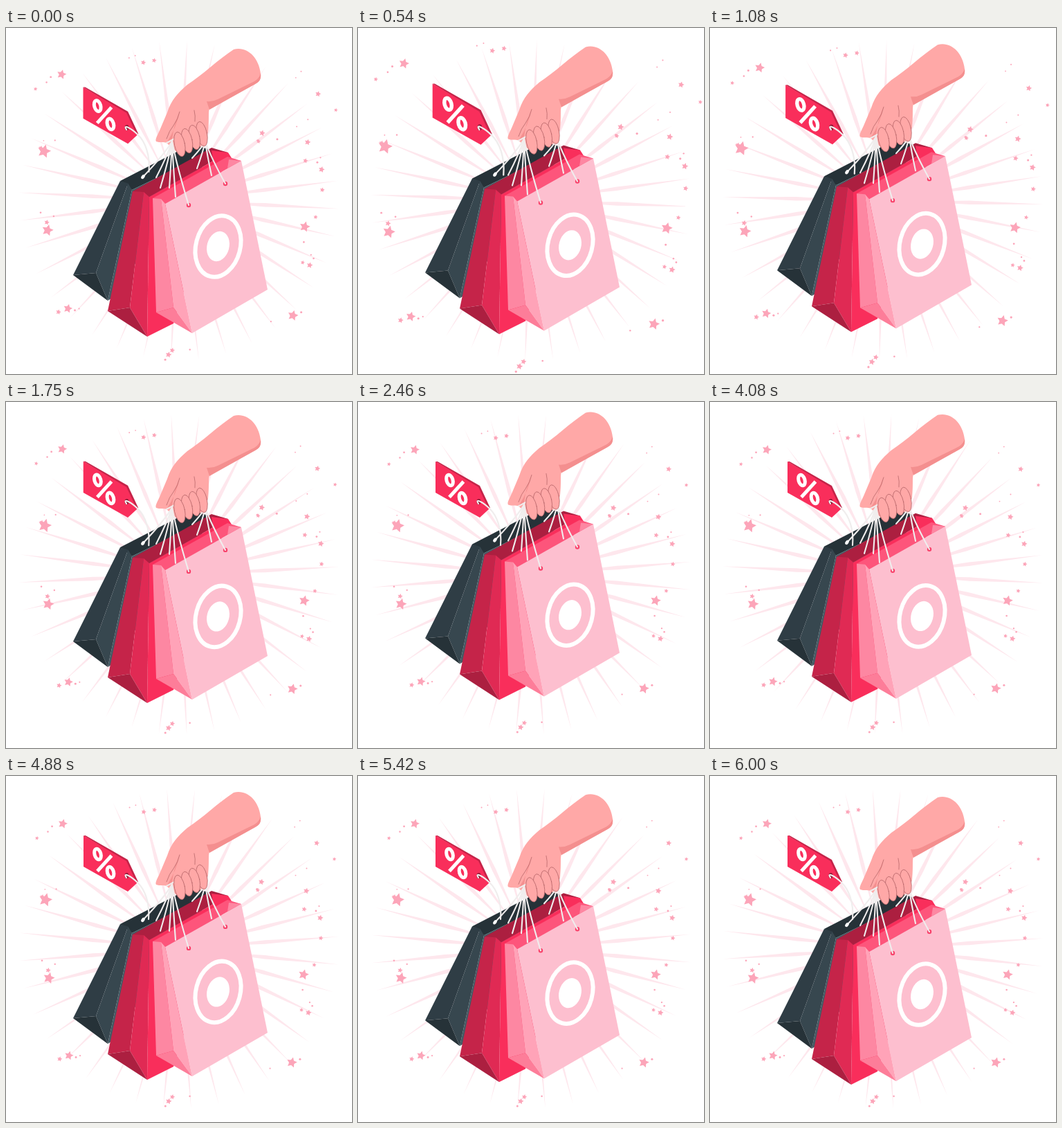
Write an HTML page that moves like this. It is 500 by 500 pixels and loops after 6040 ms.

```html
<!DOCTYPE html>
<html lang="en">
<head>
<meta charset="utf-8">
<title>Shopping bags</title>
<style>
  html, body { margin: 0; width: 100%; height: 100%; overflow: hidden; background: #fff; }
  svg { display: block; width: 100vw; height: 100vh; }
  .cord { fill: none; stroke: #f0eded; stroke-width: 2.1; stroke-linecap: round; }
  .crease { fill: none; stroke: #b8676a; stroke-width: .8; stroke-linecap: round; }
  .skin { fill: #ffa8a7; }
  .shade { fill: #f48f8f; }
  .percent { fill: none; stroke: #fff; stroke-width: 5; }
</style>
</head>
<body>
<svg viewBox="0 0 500 500">
  <g id="rays" fill="#fee7ed"></g>
  <g id="stars" fill="#fca5b9"></g>

  <g id="lift">
    <path class="skin" d="M329 31C347 26 365 41 368 66C369 74 366 78 360 81L294 117C292 122 294 130 292 150L286 172L250 182L232 166C228 164 222 166 217 164C215 161 219 155 222 148L233 122C239 104 248 94 262 82C284 68 307 45 329 31Z"/>
    <path class="shade" d="M368 66C369 74 366 78 360 81L294 118Q292 112 290 106Q298 107 306 103L355 79Q365 75 368 66Z"/>
    <path class="shade" d="M250 122Q247 143 232 166L240 160Q242 143 250 122Z"/>
    <path class="crease" d="M251 121Q249 131 242 141Q236 148 232 160M272 119Q274 127 273 135"/>
    <g id="bags"></g>
  </g>

  <g id="emblem" fill="#fff">
    <ellipse rx="32" ry="45" fill="none" stroke="#fff" stroke-width="6"/>
    <ellipse rx="16" ry="22"/>
  </g>

  <g id="tag">
    <path fill="#f92e5b" d="M112 86L175 122L190 154L176 167L112 131Z"/>
    <path fill="#c52449" d="M112 86L115 86L176 121L191 153L188 153L174 123Z"/>
    <ellipse class="percent" rx="4.500" ry="8" transform="translate(132.500 113) rotate(-16)"/>
    <ellipse class="percent" rx="4.500" ry="8" transform="translate(151 139) rotate(-16)"/>
    <path class="percent" d="M152.500 115L132 137.500"/>
    <ellipse cx="174.500" cy="144" rx="3" ry="4" fill="#8f1a36"/>
    <path class="cord" d="M174 147C168 138 181 145 190 154C201 164 208 184 206 207"/>
  </g>

  <g id="grip"></g>
</svg>
<script>
const FRAMES = 145, FRAME = 1000 / 24;
const el = id => document.getElementById(id);
const each = (n, make) => Array.from({ length: n }, (_, i) => make(i));
const poly = (fill, ...points) => `<polygon fill="${fill}" points="${points.join(' ')}"/>`;

let seed = 7;
const random = () => (seed = seed * 16807 % 2147483647) / 2147483647;
const jitter = range => (random() * 2 - 1) * range;

el('rays').innerHTML = each(36, i =>
  `<path d="M0-232L2.800-125L0-45L-2.800-125Z" transform="rotate(${i * 10})"/>`).join('');

function star(x, y, r) {
  if (r < 2.2) return `<circle cx="${x}" cy="${y}" r="${r}"/>`;
  return poly('inherit', ...each(10, k => {
    const a = .25 + k * Math.PI / 5, d = k % 2 ? r / 2 : r;
    return [x + d * Math.sin(a), y - d * Math.cos(a)];
  }));
}

// each main star has a small star and two dots scattered along its arc
function cluster([x, y, r]) {
  const angle = Math.atan2(y - 250, x - 250), reach = Math.hypot(x - 250, y - 250);
  const small = each(3, i => {
    const a = angle + jitter(.16), d = reach + jitter(16);
    return star(250 + d * Math.cos(a), 250 + d * Math.sin(a), i ? .8 + random() * .8 : 2.5 + random() * 1.5);
  });
  return star(x, y, r) + small.join('');
}
el('stars').innerHTML = [
  [82, 69, 7], [57, 179, 10], [62, 292, 8.5], [91, 404, 6.6], [235, 470, 4.5], [413, 414, 7.8], [437, 342, 4.5],
  [430, 287, 7.8], [454, 205, 4.5], [434, 166, 4.5], [369, 153, 4.5], [449, 97, 4.2], [199, 52, 3.8]
].map(cluster).join('');

// top: back left, back right, front right, front left; bottom: left, fold, front, right
function bag([bl, br, fr, fl], [left, fold, front, right], [inside, face, side, sideLit, base]) {
  const pleat = [(bl[0] + 2 * fl[0]) / 3, (bl[1] + fl[1]) / 2 - 3];
  return poly(inside, bl, br, fr, fl) + poly(face, fl, fr, right, front) +
    poly(side, bl, pleat, fold, left) + poly(sideLit, pleat, fl, front, fold) +
    poly(base, left, fold, front);
}
el('bags').innerHTML =
  bag([[165, 221], [268, 168], [300, 177], [182, 234]], [[97, 357], [130, 354], [147, 394], [152, 391]],
    ['#263238', '#455a64', '#2f3d45', '#37474f', '#263238']) +
  bag([[183, 236], [297, 173], [321, 180], [207, 244]], [[147, 409], [179, 404], [204, 446], [242, 427]],
    ['#ac1f40', '#f92e5b', '#c52449', '#e02a54', '#ac1f40']) +
  poly('#f92e5b', [297, 177], [321, 180], [328, 191], [300, 195]) +
  bag([[212, 246], [320, 186], [340, 192], [230, 254]], [[217, 411], [242, 404], [269, 441], [378, 378]],
    ['#fd557b', '#fdbfcf', '#fd87a2', '#ffa3b8', '#fd7d99']) +
  poly('#fd87a2', [322, 190], [340, 192], [320, 203]);

// cords fan out from the two sides of the fist
function cord([x, y]) {
  const hold = x < 266 ? 240 : 288;
  return `<path class="cord" d="M${hold} 164Q${hold + (x - hold) * .3} ${164 + (y - 164) * .4} ${x} ${y}"/>`;
}
const eyelet = (x, y) => `<circle cx="${x}" cy="${y}" r="3.2" fill="#f9426b"/>`;
const finger = i =>
  `<ellipse class="crease" style="fill:#ffa8a7" rx="7.500" ry="18" transform="translate(${283 - 10.7 * i} ${153 + 5 * i}) rotate(-12)"/>`;

el('grip').innerHTML = eyelet(264, 256) + eyelet(317, 225) +
  [[198, 215], [217, 216], [223, 231], [236, 231], [245, 244], [264, 256],
   [269, 188], [276, 203], [297, 213], [317, 225]].map(cord).join('') +
  '<path class="cord" d="M232 166L257 153"/>' +
  '<ellipse rx="2.300" ry="3.500" transform="translate(198 215) rotate(35)" fill="#fff"/>' +
  each(4, finger).join('');

// rises from 0 to 1 and falls back, both linearly
const bump = (t, peak, rise, fall) => Math.max(0, 1 - (t < peak ? (peak - t) / rise : (t - peak) / fall));
const place = (id, value) => el(id).setAttribute('transform', value);
const scaleAt = (x, y, s) => `translate(${x} ${y}) scale(${s}) translate(${-x} ${-y})`;

function draw(now) {
  // the picture advances in 24 steps a second
  const t = Math.floor((now % 6040 + 5) / FRAME) % FRAMES * FRAME;
  const beat = 1 + .1 * bump(t, 600, 667, 1210) + .09 * bump(t, 2980, 510, 620);
  const rise = 19 * bump(t, 3000, 3000, 3000);
  place('rays', `translate(250 249.500) rotate(${2.9 + t * .0539})`);
  place('stars', scaleAt(253, 262, beat));
  place('tag', scaleAt(159.5, 147.5, beat));
  place('lift', `translate(0 ${-rise})`);
  place('grip', `translate(0 ${-rise})`);
  place('emblem', `translate(306.500 ${315.5 - rise / 2}) rotate(15)`);
}

let start;
function tick(now) {
  start ??= now;
  draw(now - start);
  requestAnimationFrame(tick);
}
draw(0);
requestAnimationFrame(tick);
</script>
</body>
</html>
```
